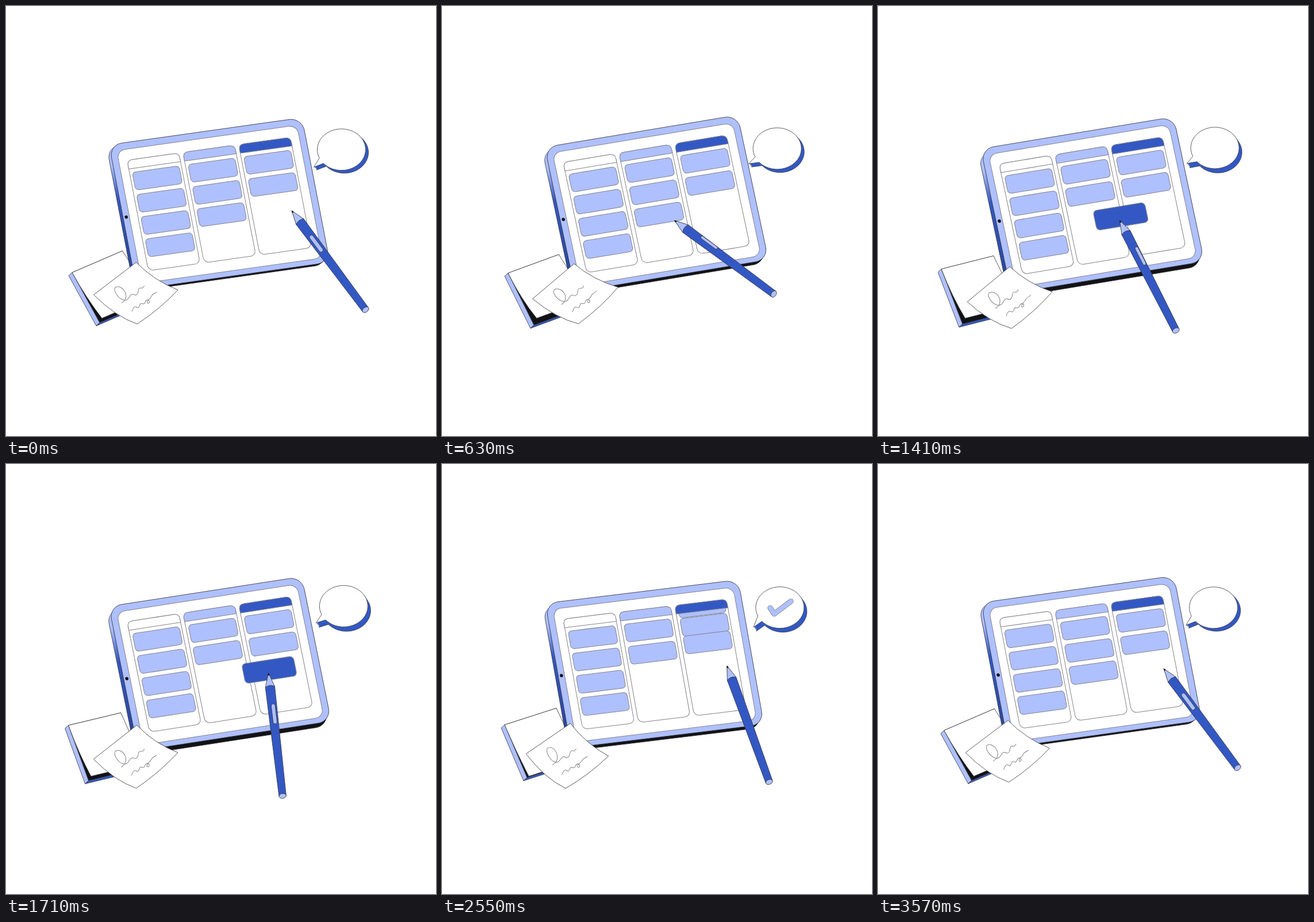
An HTML page that plays this animation: 748 px wide and 748 px high, repeating every 3.6 s.

```html
<!DOCTYPE html>
<html lang="en">
<head>
<meta charset="utf-8">
<title>Task board</title>
<style>
html, body { margin: 0; width: 100%; height: 100%; overflow: hidden; background: #fff; }
svg { display: block; width: 100vw; height: 100vh; }
.line { stroke: #36363c; stroke-width: .8; stroke-linejoin: round; }
.thin { stroke: #84848c; stroke-width: 1; stroke-linejoin: round; }
.light { fill: #afc0ff; }
.blue { fill: #3358c4; }
.ink { fill: #111216; }
.white { fill: #fff; }
.none { fill: none; }
</style>
</head>
<body>
<svg viewBox="0 0 748 748" xmlns="http://www.w3.org/2000/svg">
  <defs>
    <linearGradient id="edge" gradientUnits="userSpaceOnUse" x1="-28" y1="-30" x2="100" y2="98">
      <stop offset=".14" stop-color="#afc0ff"/>
      <stop offset=".36" stop-color="#3358c4"/>
      <stop offset=".84" stop-color="#2a479f"/>
      <stop offset=".95" stop-color="#111216"/>
    </linearGradient>
    <clipPath id="below"><rect x="-20" y="15" width="340" height="220"/></clipPath>
  </defs>

  <g id="notebook">
    <path id="inside" class="ink line"/>
    <path id="spine" class="light line"/>
    <path id="foot" class="blue line"/>
    <path id="paper" class="white line"/>
  </g>

  <g id="body"></g>
  <g id="tablet">
    <rect class="light line" x="-25.5" y="-30.5" width="335.5" height="251.5" rx="22"/>
    <rect class="white thin" x="-14.5" y="-19" width="313.5" height="231" rx="14"/>
    <circle class="ink" cx="-20" cy="96" r="2.8"/>
    <g id="columns"></g>
    <g id="cards" clip-path="url(#below)"></g>
    <g id="headers"></g>
  </g>

  <g id="sheet">
    <path class="white line" d="M153 502L227 446Q258 478 299 495Q268 528 228 554Q190 540 153 502Z"/>
    <path class="none thin" d="M201 517C209 513 211 504 207 497C203 489 194 486 190 490C187 496 196 510 206 512C214 513 214 504 219 502C223 500 224 506 228 502C232 498 229 492 233 491C236 490 237 494 241 487"/>
    <path class="none thin" d="M219 532C221 526 224 522 227 524C230 527 232 524 233 520C235 515 238 521 241 518C243 515 243 511 247 512C252 514 249 520 246 517C244 513 250 511 253 506C256 499 258 503 262 498"/>
  </g>

  <g id="bubble">
    <g id="rim"></g>
    <path id="balloon" class="white line"/>
    <g id="check" fill="none" stroke-linecap="round" stroke-linejoin="round">
      <path stroke="#84848c" stroke-width="9.4" pathLength="1" d="M-16.5 1L-9.5 11.5L19.5-10.5"/>
      <path stroke="#afc0ff" stroke-width="7.8" pathLength="1" d="M-16.5 1L-9.5 11.5L19.5-10.5"/>
    </g>
  </g>

  <g id="pen">
    <path class="light line" d="M0 0L24-8.2Q28 0 24 8.2Z"/>
    <path class="ink" d="M-.5 0L4-1.8V1.8Z"/>
    <path class="blue line" d="M24-8.2Q19 0 24 8.2L215 6.2V-6.2Z"/>
    <ellipse class="light line" cx="215" rx="4.2" ry="6.2"/>
    <rect id="button" class="light line" x="54" width="35"/>
  </g>
</svg>

<script>
const LOOP = 3600;
const PITCH = 38.7, COLUMN = 97, CARD_W = 81.5, CARD_H = 31;
const $ = id => document.getElementById(id);
const set = (el, name, value) => el.setAttribute(name, value);

function add(parent, tag, attrs) {
  const el = document.createElementNS('http://www.w3.org/2000/svg', tag);
  for (const k in attrs) set(el, k, attrs[k]);
  return parent.appendChild(el);
}

const part = (t, from, to) => Math.min(1, Math.max(0, (t - from) / (to - from)));
function ease(t, from, to) {
  const p = part(t, from, to);
  return p * p * (3 - 2 * p);
}
const glide = (t, from, to) => 1 - (1 - part(t, from, to)) ** 2;

// One slow sway per loop, highest at the given angle
const swayAt = t => (mean, size, peak) =>
  mean + size * Math.cos(2 * Math.PI * t / LOOP - peak * Math.PI / 180);

const layers = [1, .8, .6, .4, .2].map((k, i) => ({
  k,
  slab: add($('body'), 'rect', {
    x: -25.5, y: -30.5, width: 335.5, height: 251.5, rx: 22,
    fill: 'url(#edge)', class: i ? '' : 'line'
  }),
  rim: add($('rim'), 'path', { class: i ? 'blue' : 'blue line' })
}));

['white', 'light', 'blue'].forEach((tone, i) => {
  const x = i * COLUMN;
  add($('columns'), 'rect', { class: 'none thin', x, width: 90, height: 192, rx: 9 });
  add($('headers'), 'path', {
    class: tone + ' thin', transform: `translate(${x})`,
    d: 'M0 15V9Q0 0 9 0H81Q90 0 90 9V15Z'
  });
});

const card = () => add($('cards'), 'rect', {
  class: 'thin', fill: '#afc0ff', x: -CARD_W / 2, y: -CARD_H / 2,
  width: CARD_W, height: CARD_H, rx: 6
});
function place(el, col, slot, dx = 0, dy = 0, size = 1) {
  const x = col * COLUMN + 45.4 + dx, y = 37.2 + slot * PITCH + dy;
  set(el, 'transform', `translate(${x} ${y}) scale(${size})`);
}
for (let i = 0; i < 4; i++) place(card(), 0, i);
const second = [card(), card(), card()].reverse();
const third = [card(), card()];
const moved = card();

const mix = (a, b, p) => 'rgb(' + a.map((v, i) => Math.round(v + (b[i] - v) * p)) + ')';
const poly = (...pts) => 'M' + pts.join('L') + 'Z';
const plus = (p, q) => [p[0] + q[0], p[1] + q[1]];
const minus = (p, q) => [p[0] - q[0], p[1] - q[1]];

function drawTablet(t) {
  const sway = swayAt(t);
  const x = 210.7, y = sway(271.2, 3.6, 141);
  const right = sway(229.8, 5.3, 255), lean = sway(37.7, 4, 100);
  const depth = sway(5.6, 2.3, 160);
  const axes = [1, (right - y) / 284, lean / 192, 1];
  const at = k => `matrix(${[...axes, x - 4.2 * k, y + depth * k]})`;
  set($('tablet'), 'transform', at(0));
  layers.forEach(l => set(l.slab, 'transform', at(l.k)));
}

function drawCards(t) {
  second.forEach((el, i) =>
    place(el, 1, i - 1 + ease(t, 2900 + i * 70, 3350 + i * 50)));

  place(third[0], 2, -1.05 * ease(t, 2270, 2690));
  place(third[1], 2, 1 - 1.08 * ease(t, 2230, 2640) + .08 * ease(t, 2640, 2860));

  const drag = ease(t, 910, 1990);
  const lift = ease(t, 850, 1010) - ease(t, 1820, 1980);
  const rise = 1.16 * ease(t, 2200, 2520) - .16 * ease(t, 2550, 2820);
  const dark = ease(t, 830, 960) - ease(t, 2010, 2230);
  place(moved, 1, 2 - rise, COLUMN * drag, 7.5 * Math.sin(Math.PI * drag), 1 + .1 * lift);
  set(moved, 'fill', mix([175, 192, 255], [51, 88, 196], dark));
}

function drawBook(t) {
  const sway = swayAt(t);
  const a = [sway(111.7, 3.9, 30), sway(458.8, 6.3, 40)];
  const b = [sway(201, 2.3, 50), sway(429, 6, 120)];
  const d = [sway(157, 10.5, 20), 543.2];
  const f = [sway(147, 10.3, 15), sway(556, 5, 85)];
  const e = plus(a, [-6, 5.5]);
  const g = plus(a, minus(f, e));
  const across = minus(b, a);
  const bend = [(a[0] + g[0]) / 2, (a[1] + g[1]) / 2];
  set($('inside'), 'd', poly(a, b, plus(g, across), g));
  set($('spine'), 'd', poly(e, a, g, f));
  set($('foot'), 'd', poly(f, g, plus(g, across), plus(f, across)));
  set($('paper'), 'd', `M${a}L${b}L${plus(d, across)}L${d}Q${bend} ${a}Z`);
}

// Shears the sheet so its left, top and bottom corners sway apart
function drawSheet(t) {
  const sway = swayAt(t);
  const left = [sway(152, 6, 85), sway(507.5, 7, 138)];
  const top = [sway(226.7, 3.6, 95), sway(450.2, 4.2, 180)];
  const bottom = [sway(226.5, 11.5, 82), sway(559, 7, 215)];
  const [p, q] = minus(top, left), [r, s] = minus(bottom, left);
  const det = 74 * 52 + 56 * 75;
  const a = (52 * p + 56 * r) / det, c = (74 * r - 75 * p) / det;
  const b = (52 * q + 56 * s) / det, d = (74 * s - 75 * q) / det;
  const e = left[0] - a * 153 - c * 502, f = left[1] - b * 153 - d * 502;
  set($('sheet'), 'transform', `matrix(${[a, b, c, d, e, f]})`);
}

function drawBubble(t) {
  const sway = swayAt(t);
  const tip = [sway(-47.5, 2, 265), sway(30.5, 4.3, 275)];
  const depth = sway(6.4, 1.4, 185);
  const d = `M-38 15A42 36 0 1 1-31 24.3L${tip}Z`;
  set($('bubble'), 'transform',
    `translate(${sway(585.2, 2.7, 220)} ${sway(248.3, 1.8, 310)})`);
  set($('balloon'), 'd', d);
  layers.forEach(l => {
    set(l.rim, 'd', d);
    set(l.rim, 'transform', `translate(${5 * l.k} ${depth * l.k})`);
  });
  const from = ease(t, 2950, 3300), len = ease(t, 2240, 2490) - from;
  set($('check'), 'visibility', len > .01 ? 'visible' : 'hidden');
  set($('check'), 'stroke-dasharray', `${Math.max(len, .01)} 3`);
  set($('check'), 'stroke-dashoffset', -from);
}

// Reach for the card, drag it across, then settle back
function drawPen(t) {
  const x = 497 - 118 * ease(t, 0, 900) + 93 * ease(t, 910, 1990)
    + 31 * glide(t, 2040, 3030) - 6 * ease(t, 3030, 3600);
  const y = 356 + 17 * (ease(t, 0, 600) - ease(t, 1400, 1990))
    - 5 * (ease(t, 1800, 2040) - ease(t, 3050, 3600));
  const angle = 53.3 - 16.8 * ease(t, 0, 650) + 56.4 * ease(t, 860, 2010)
    - 39.6 * glide(t, 2040, 3500);
  const roll = 45 * (ease(t, 0, 600) - ease(t, 1150, 2040))
    - 130 * (ease(t, 2040, 2500) - ease(t, 2600, 3550));
  const r = roll * Math.PI / 180, h = Math.max(0, 7 * Math.cos(r));
  const button = $('button');
  set($('pen'), 'transform', `translate(${x} ${y}) rotate(${angle})`);
  set(button, 'visibility', h > 0 ? 'visible' : 'hidden');
  set(button, 'height', h);
  set(button, 'y', -7 * Math.sin(r) - h / 2);
  set(button, 'rx', h / 2);
}

const scene = [drawBook, drawTablet, drawCards, drawSheet, drawBubble, drawPen];
const start = performance.now();
function tick() {
  const t = (performance.now() - start) % LOOP;
  scene.forEach(draw => draw(t));
  requestAnimationFrame(tick);
}
tick();
</script>
</body>
</html>
```
